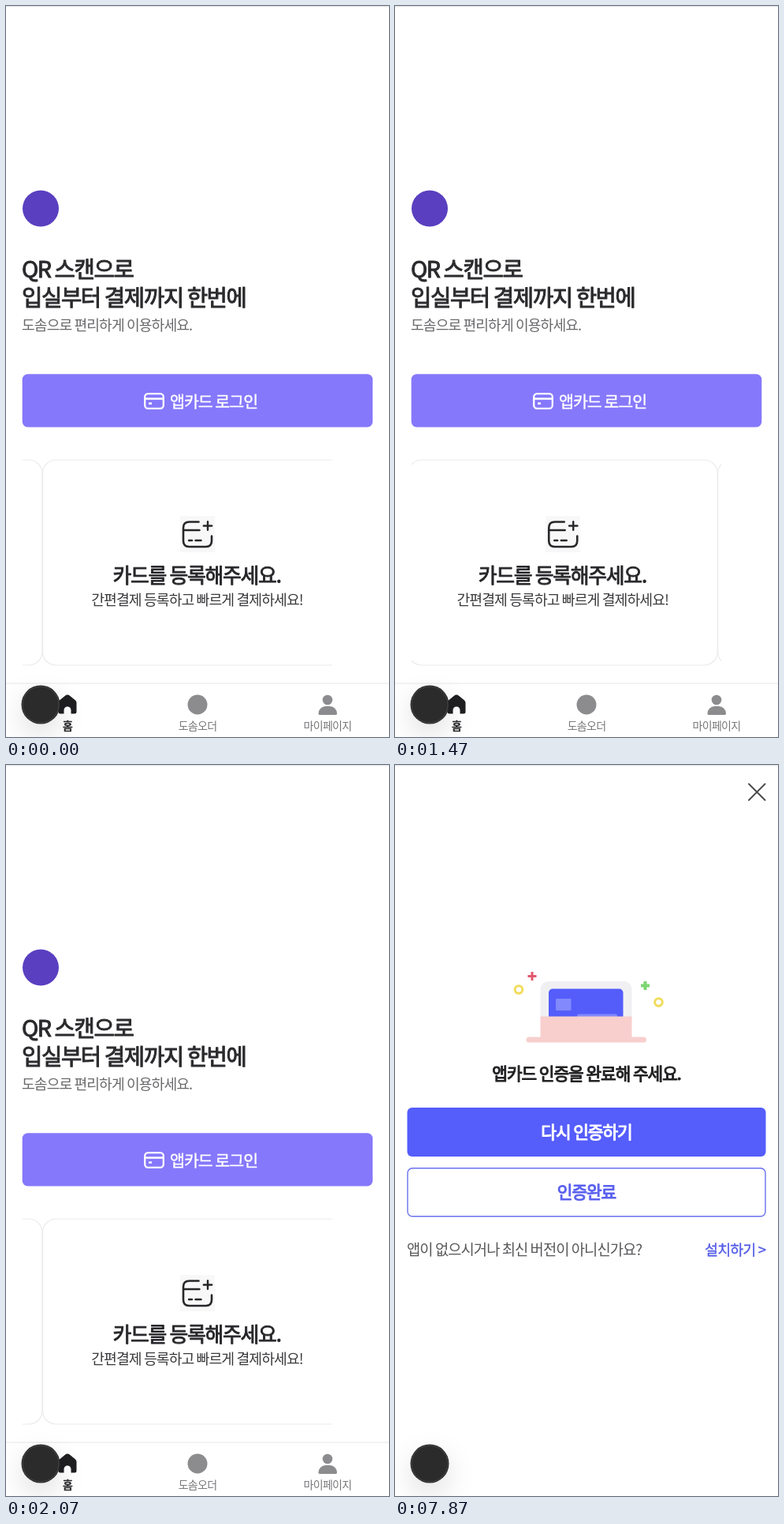
Write an HTML page with a canvas that moves like this. It is 486 px wide and 926 px high and loops after 8 s.

```html
<!DOCTYPE html>
<html lang="ko">
<head>
<meta charset="utf-8">
<style>
html, body { margin: 0; width: 100%; height: 100%; overflow: hidden; background: #fff; }
canvas { display: block; width: 486px; height: 926px; }
</style>
</head>
<body>
<canvas></canvas>
<script>
const W = 486, H = 926, LOOP = 8000;
const KR = '"Noto Sans CJK KR", "Noto Sans CJK", sans-serif';
const MEDIUM = 0.02, SEMI = 0.035, BOLD = 0.05;
const canvas = document.querySelector('canvas');
const ctx = canvas.getContext('2d');
const dpr = window.devicePixelRatio || 1;
canvas.width = W * dpr;
canvas.height = H * dpr;

// In-between weights come from a thin stroke (in em) around the regular face.
function text(str, x, y, size, color, weight = 0, align = 'left') {
  ctx.font = `400 ${size}px ${KR}`;
  ctx.letterSpacing = size * -0.05 + 'px';
  ctx.wordSpacing = '0px';
  ctx.textAlign = align;
  ctx.fillStyle = ctx.strokeStyle = color;
  ctx.fillText(str, x, y);
  if (!weight) return;
  ctx.lineWidth = size * weight;
  ctx.lineJoin = 'round';
  ctx.strokeText(str, x, y);
}

function rect(x, y, w, h, r, fill) {
  ctx.beginPath();
  ctx.roundRect(x, y, w, h, r);
  ctx.fillStyle = fill;
  ctx.fill();
}

function outline(x, y, w, h, r, color, width) {
  ctx.beginPath();
  ctx.roundRect(x, y, w, h, r);
  ctx.strokeStyle = color;
  ctx.lineWidth = width;
  ctx.stroke();
}

function disc(x, y, r, fill) {
  ctx.beginPath();
  ctx.arc(x, y, r, 0, Math.PI * 2);
  ctx.fillStyle = fill;
  ctx.fill();
}

function ring(x, y, r, color, width) {
  ctx.beginPath();
  ctx.arc(x, y, r, 0, Math.PI * 2);
  ctx.strokeStyle = color;
  ctx.lineWidth = width;
  ctx.stroke();
}

function draw(path, color, width, cap = 'round') {
  ctx.strokeStyle = color;
  ctx.lineWidth = width;
  ctx.lineCap = cap;
  ctx.lineJoin = 'round';
  ctx.stroke(new Path2D(path));
}

function plus(x, y, r, color, width, cap) {
  draw(`M${x - r} ${y}h${2 * r}M${x} ${y - r}v${2 * r}`, color, width, cap);
}

function badge() {
  ctx.save();
  ctx.shadowColor = 'rgba(0,0,0,.13)';
  ctx.shadowBlur = 36 * dpr;
  ctx.shadowOffsetY = 14 * dpr;
  disc(44, 885, 24.5, '#2b2b2b');
  ctx.restore();
  ring(44, 885, 23, '#454545', 1);
}

// Carousel spring: closed form of v = .68 * (v + gap / 25), stepped at 60 Hz.
const PITCH = 393;

function slide(t) {
  const tick = Math.floor((t + 3.4) / (200 / 3));
  if (tick < 16) return 0;
  if (tick > 28) return PITCH;
  const n = (tick - 16) * 4 + 1;
  return PITCH * (1 - 1.851 * Math.pow(0.8806, n) + 0.851 * Math.pow(0.7722, n));
}

function card(x) {
  ctx.save();
  ctx.translate(x, 0);
  outline(0, 575, PITCH - 0.5, 260, 17, '#ebebed', 1.2);
  rect(174.5, 646, 44, 46, 0, '#f8f8f9');
  const ink = '#27272a';
  draw('M198 653.500h-12q-7.500 0-7.500 7.500v16.500q0 7.500 7.500 7.500h21q7.500 0 7.500-7.500v-6', ink, 2.6);
  draw('M179 664h20M185.500 677h4M194 677h7', ink, 2.4);
  plus(209.5, 658.5, 5.2, ink, 2.4);
  text('카드를 등록해주세요.', 195.5, 730.5, 25.9, '#27272a', SEMI, 'center');
  text('간편결제 등록하고 빠르게 결제하세요!', 196, 759, 18.25, '#3a3a3d', 0, 'center');
  ctx.restore();
}

function home(t) {
  disc(44, 256.5, 23, '#5a3fc0');
  text('QR 스캔으로', 20, 343.5, 28.7, '#2b2b2e', SEMI);
  text('입실부터 결제까지 한번에', 20, 379.5, 28.7, '#2b2b2e', SEMI);
  text('도솜으로 편리하게 이용하세요.', 20, 410.5, 18.2, '#69696c');

  rect(20.7, 466.2, 444.6, 67.3, 7, '#8678fb');
  outline(176.2, 491.2, 23.6, 18.6, 4, '#fff', 2.3);
  draw('M176 497.500h24M181 503.500h4', '#fff', 2.3, 'butt');
  text('앱카드 로그인', 208, 509, 20.6, '#fff', MEDIUM);

  ctx.save();
  ctx.beginPath();
  ctx.rect(21, 570, 393, 270);
  ctx.clip();
  const x = 46.5 + slide(t) % PITCH;
  card(x - PITCH);
  card(x);
  ctx.restore();

  rect(0, 858, W, 68, 0, '#fff');
  rect(0, 857.5, W, 1.3, 0, '#ececee');
  ctx.fillStyle = '#1f1f22';
  ctx.fill(new Path2D('M78 872.500q1.500 0 3 1.200l7 5.800q1.500 1.300 1.500 3v11.500q0 2.500-2.500 2.500h-4.500v-4.500a4.500 4.500 0 0 0-9 0v4.500h-4.500q-2.500 0-2.500-2.500v-11.500q0-1.700 1.500-3l7-5.800q1.500-1.200 3-1.200z'));
  text('홈', 78, 917, 13.9, '#222225', BOLD, 'center');
  disc(243, 885, 12.5, '#8c8c8e');
  text('도솜오더', 243, 917, 14, '#77777a', 0, 'center');
  disc(408, 879, 6.3, '#8c8c8e');
  rect(396.5, 887, 23.5, 11, [10, 10, 2, 2], '#8c8c8e');
  text('마이페이지', 408, 917, 14, '#77777a', 0, 'center');
}

function inactive() {
  rect(0, 0, W, H, 0, 'rgba(31,31,33,.8)');
  ctx.font = '400 58px "Open Sans", "Noto Sans", sans-serif';
  ctx.letterSpacing = '-0.5px';
  ctx.wordSpacing = '5.5px';
  ctx.textAlign = 'left';
  ctx.fillStyle = '#f2e6e8';
  ctx.fillText('The tab is', -1, 415);
  ctx.fillText('inactive', -2, 494.5);
}

function verify() {
  const blue = '#555dfb';
  draw('M449 24l20.500 20.500M469.500 24l-20.500 20.500', '#4a4a4c', 1.9);

  rect(184.5, 274, 116, 50, [10, 10, 0, 0], '#f0f0f3');
  rect(195, 283.5, 94.5, 36, [5, 5, 0, 0], '#545dfa');
  rect(204, 296, 19.5, 15, 1, '#8189fc');
  rect(231, 315.5, 51, 4, [2, 2, 0, 0], '#8189fc');
  rect(184.5, 318.5, 116, 30, 0, '#f8cfcd');
  rect(166.5, 344.5, 152.5, 7, 3.5, '#f8cfcd');
  plus(174, 267.5, 5.5, '#e2596d', 3, 'butt');
  plus(317.5, 279.5, 5.5, '#7bd672', 4, 'butt');
  ring(157, 284.5, 4.8, '#f1dc5c', 3);
  ring(334.5, 300.5, 4.8, '#f1dc5c', 3);

  text('앱카드 인증을 완료해 주세요.', 243, 398.5, 21.4, '#222224', BOLD, 'center');
  rect(15.5, 434, 455, 62, 6, blue);
  text('다시 인증하기', 243, 472.5, 21.4, '#fff', BOLD, 'center');
  outline(16, 510.8, 454, 61, 6, '#6a70ee', 1.4);
  text('인증완료', 243, 548.5, 21.4, '#5a61ee', BOLD, 'center');
  text('앱이 없으시거나 최신 버전이 아니신가요?', 15, 621, 18.75, '#58585b');
  text('설치하기 >', 470, 621, 18.5, '#555ce6', MEDIUM, 'right');
}

function render() {
  const t = performance.now() % LOOP;
  ctx.setTransform(dpr, 0, 0, dpr, 0, 0);
  rect(0, 0, W, H, 0, '#fff');
  if (t < 7870) home(t);
  else verify();
  rect(0, 0, W, 1.2, 0, '#e6e6e8');
  badge();
  if (t >= 5070 && t < 7730) inactive();
  requestAnimationFrame(render);
}
render();
</script>
</body>
</html>
```
